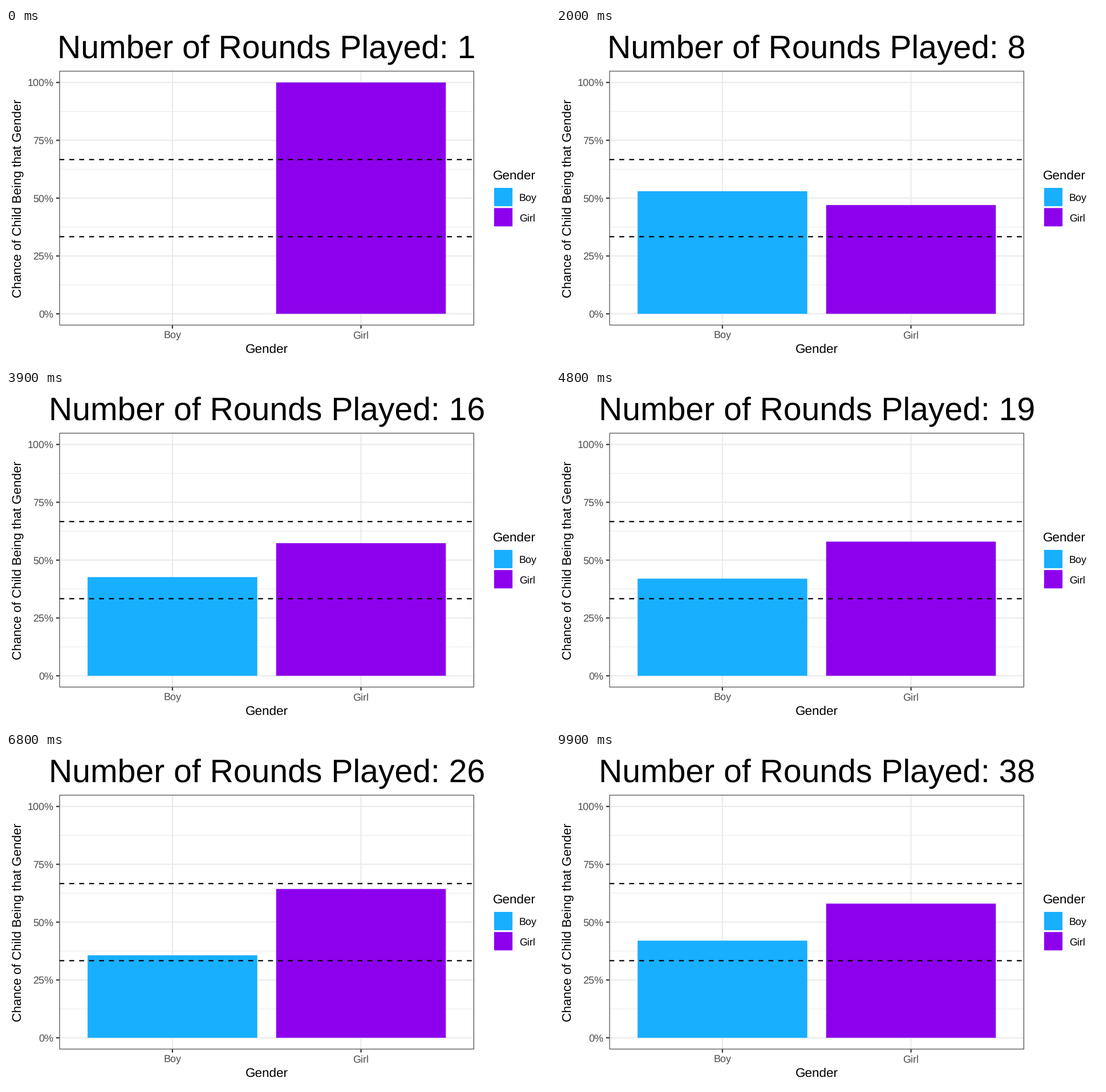
These frames come from a looping animation (954 px wide and 587 px high, 10 s). A matplotlib script:

```python
import matplotlib.pyplot as plt
import numpy as np
from matplotlib.animation import FuncAnimation
from matplotlib.patches import Rectangle

W, H, DPI = 954, 587, 64
FRAMES, ROUNDS = 100, 38
PT = 2.042                      # pixels per typographic point
LEFT, RIGHT, TOP, BOTTOM = 93.5, 820.9, 75.4, 522.6
LINE = 1.067 * PT
BOY, GIRL = "#18AFFF", "#8C00EC"
GRID, DARK, TICK_TEXT = "#EBEBEB", "#333333", "#4D4D4D"

plt.rcParams.update({
    "font.family": "Liberation Sans",
    "text.hinting": "none",
    "lines.dash_capstyle": "butt",
    "lines.solid_capstyle": "butt",
    "lines.scale_dashes": False,
})

fig = plt.figure(figsize=(W / DPI, H / DPI), dpi=DPI, facecolor="white")
ax = fig.add_axes([0, 0, 1, 1])
ax.set_xlim(0, W)
ax.set_ylim(H, 0)
ax.axis("off")


def px(n):
    return n * 72 / DPI


def x_at(category):
    return LEFT + (category - 0.4) / 2.2 * (RIGHT - LEFT)


def y_at(share):
    return BOTTOM - (share + 0.05) / 1.1 * (BOTTOM - TOP)


def line(x0, y0, x1, y1, color, width=LINE, z=1, **kw):
    ax.plot([x0, x1], [y0, y1], color=color, lw=px(width), zorder=z,
            snap=False, **kw)


def rect(x, y, w, h, color, z=2):
    return ax.add_patch(Rectangle((x, y), w, h, fc=color, lw=0, zorder=z,
                                  snap=False))


def text(x, y, s, points, color="black", ha="center", **kw):
    return ax.text(x, y, s, fontsize=px(points * PT), color=color, ha=ha,
                   va="baseline", zorder=6, **kw)


# Grid, axes and tick labels
for share in (0.125, 0.375, 0.625, 0.875):
    line(LEFT, y_at(share), RIGHT, y_at(share), GRID, LINE / 2)
for share in (0, 0.25, 0.5, 0.75, 1):
    y = y_at(share)
    line(LEFT, y, RIGHT, y, GRID)
    line(LEFT - 2.75 * PT, y, LEFT, y, DARK)
    text(83.4, y + 6.5, f"{share:.0%}", 8.8, TICK_TEXT, ha="right")
for pos, name in ((1, "Boy"), (2, "Girl")):
    x = x_at(pos)
    line(x, TOP, x, BOTTOM, GRID)
    line(x, BOTTOM, x, BOTTOM + 2.75 * PT, DARK)
    text(x, 545.6, name, 8.8, TICK_TEXT)

# Threshold lines and panel border
for share in (1 / 3, 2 / 3):
    line(LEFT, y_at(share), RIGHT, y_at(share), "black", z=4,
         dashes=(px(4 * LINE), px(4 * LINE)))
ax.add_patch(Rectangle((LEFT + 0.5, TOP + 0.5), RIGHT - LEFT - 1,
                       BOTTOM - TOP - 1, fill=False, ec=DARK,
                       lw=px(LINE / 2), zorder=5, snap=False))

mid_x = (LEFT + RIGHT) / 2
text(mid_x, 572, "Gender", 11)
text(27, (TOP + BOTTOM) / 2, "Chance of Child Being that Gender", 11,
     rotation=90).set(ha="right", va="center")
ax.texts[-1].set(ha="center", va="center", x=21.3)
title = text(mid_x, 53, "", 28)

# Legend
text(854.3, 267, "Gender", 11, ha="left")
for y, name, color in ((281, "Boy", BOY), (316.4, "Girl", GIRL)):
    rect(856, y, 32.2, 32.2, color)
    text(899.8, y + 23.4, name, 8.8, ha="left")

# Running shares after each round, tweened linearly between rounds
boy_rounds = [3, 5, 6, 8, 9, 12, 16, 19, 23, 27, 32, 33, 34, 36, 37, 38]
rounds = np.arange(1, ROUNDS + 1)
boys = np.cumsum(np.isin(rounds, boy_rounds))
boy_share = np.round(boys / rounds, 2)
keys = np.round((rounds - 1) * (FRAMES - 1) / (ROUNDS - 1))

bar_w = x_at(1.45) - x_at(0.55)
boy_bar = rect(x_at(0.55), y_at(0), bar_w, 0, BOY)
girl_bar = rect(x_at(1.55), y_at(0), bar_w, 0, GIRL)


def update(i):
    share = np.interp(i, keys, boy_share)
    boy_bar.set_height(y_at(share) - y_at(0))
    girl_bar.set_height(y_at(1 - share) - y_at(0))
    played = round(1 + (ROUNDS - 1) * i / (FRAMES - 1))
    title.set_text(f"Number of Rounds Played: {played}")
    return boy_bar, girl_bar, title


anim = FuncAnimation(fig, update, frames=FRAMES, interval=100,
                     init_func=lambda: update(0), repeat=True, repeat_delay=0)
plt.show()
```
